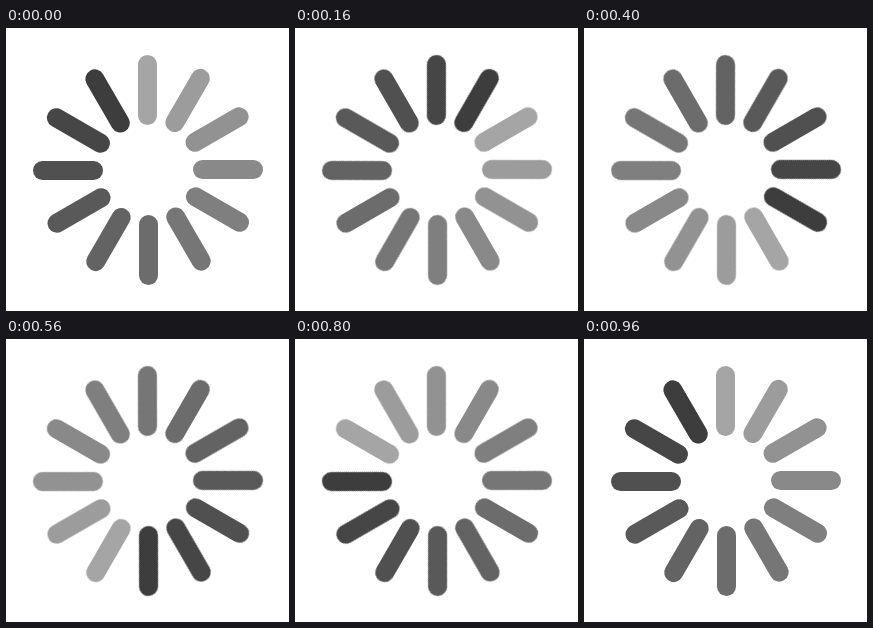
An HTML page that plays this animation: 283x283 px, repeating every 1040 ms.

```html
<!DOCTYPE html>
<html lang="en">
<head>
<meta charset="utf-8">
<title>Loading spinner</title>
<style>
  html, body { margin: 0; width: 100%; height: 100%; overflow: hidden; background: #fff; }
  svg { display: block; width: 100vw; height: 100vh; }

  /* 13 ticks of 80 ms: a full turn, with the first pose held twice across the seam */
  .wheel { animation: tick 1040ms steps(13, end) infinite; }
  @keyframes tick {
    from { transform: rotate(0deg); }
    to { transform: rotate(390deg); }
  }
</style>
</head>
<body>
<svg viewBox="0 0 283 283">
  <g transform="translate(142 142)">
    <g class="wheel" id="wheel"></g>
  </g>
</svg>
<script>
  const BARS = 12, LIGHT = 165, DARK = 61;
  const wheel = document.getElementById('wheel');

  for (let i = 0; i < BARS; i++) {
    const gray = Math.round(LIGHT + (DARK - LIGHT) * i / (BARS - 1));
    const bar = document.createElementNS('http://www.w3.org/2000/svg', 'rect');
    const attrs = {
      x: -10, y: -115, width: 19, height: 70, rx: 9.5,
      fill: `rgb(${gray},${gray},${gray})`,
      transform: `rotate(${i * 360 / BARS})`
    };
    for (const name in attrs) bar.setAttribute(name, attrs[name]);
    wheel.appendChild(bar);
  }
</script>
</body>
</html>
```
